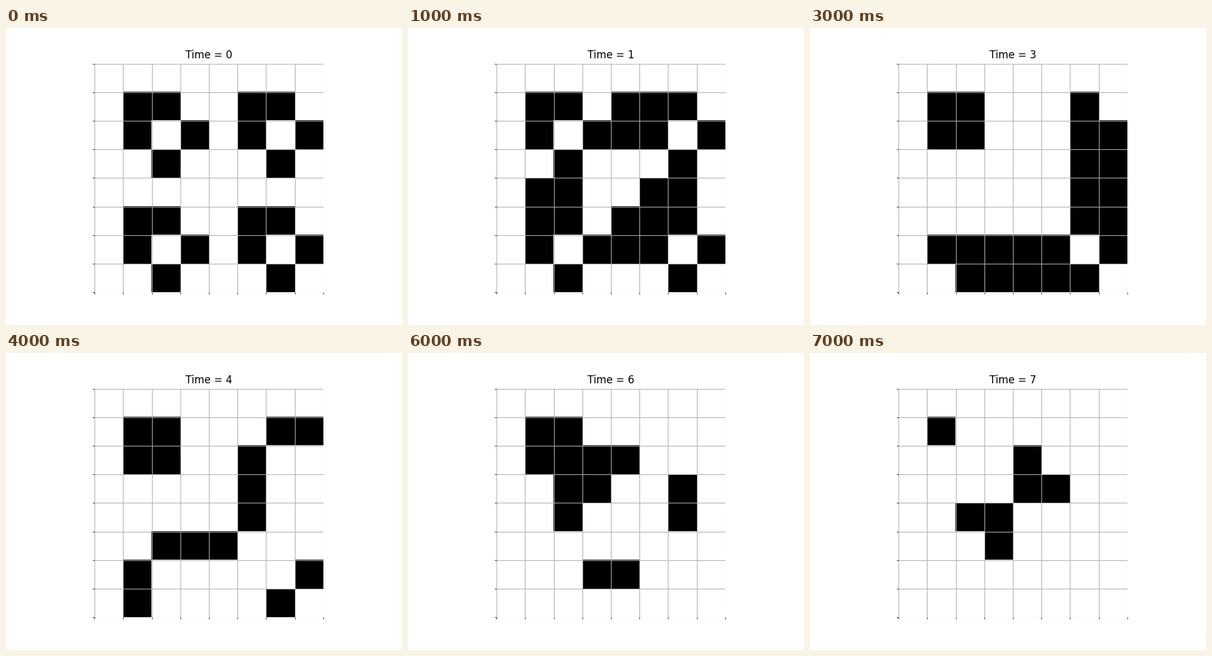
Animation of 640 by 480 pixels, one loop 8000 ms. Source, as a matplotlib script:

```python
import numpy as np
import matplotlib.pyplot as plt
from matplotlib.animation import FuncAnimation

SIZE = 8
STEPS = 8


def step(grid):
    """One Game of Life generation with dead cells beyond the border."""
    padded = np.pad(grid, 1)
    neighbours = sum(
        padded[1 + dy:1 + dy + SIZE, 1 + dx:1 + dx + SIZE]
        for dy in (-1, 0, 1)
        for dx in (-1, 0, 1)
        if (dy, dx) != (0, 0)
    )
    born_or_kept = (neighbours == 3) | ((grid == 1) & (neighbours == 2))
    return born_or_kept.astype(int)


boat = np.array([
    [0, 0, 0, 0],
    [0, 1, 1, 0],
    [0, 1, 0, 1],
    [0, 0, 1, 0],
])
generations = [np.tile(boat, (2, 2))]
while len(generations) < STEPS:
    generations.append(step(generations[-1]))

fig, ax = plt.subplots(figsize=(6.4, 4.8), dpi=100)
image = ax.imshow(generations[0], cmap="binary", vmin=0, vmax=1)
title = ax.set_title("Time = 0")

edges = np.arange(SIZE + 1) - 0.5
ax.set_xticks([])
ax.set_yticks([])
ax.set_xticks(edges, minor=True)
ax.set_yticks(edges, minor=True)
ax.grid(which="minor")
ax.spines[:].set_visible(False)


def update(t):
    image.set_data(generations[t])
    title.set_text(f"Time = {t}")
    return image, title


anim = FuncAnimation(fig, update, frames=STEPS, interval=1000, repeat=True)
plt.show()
```
